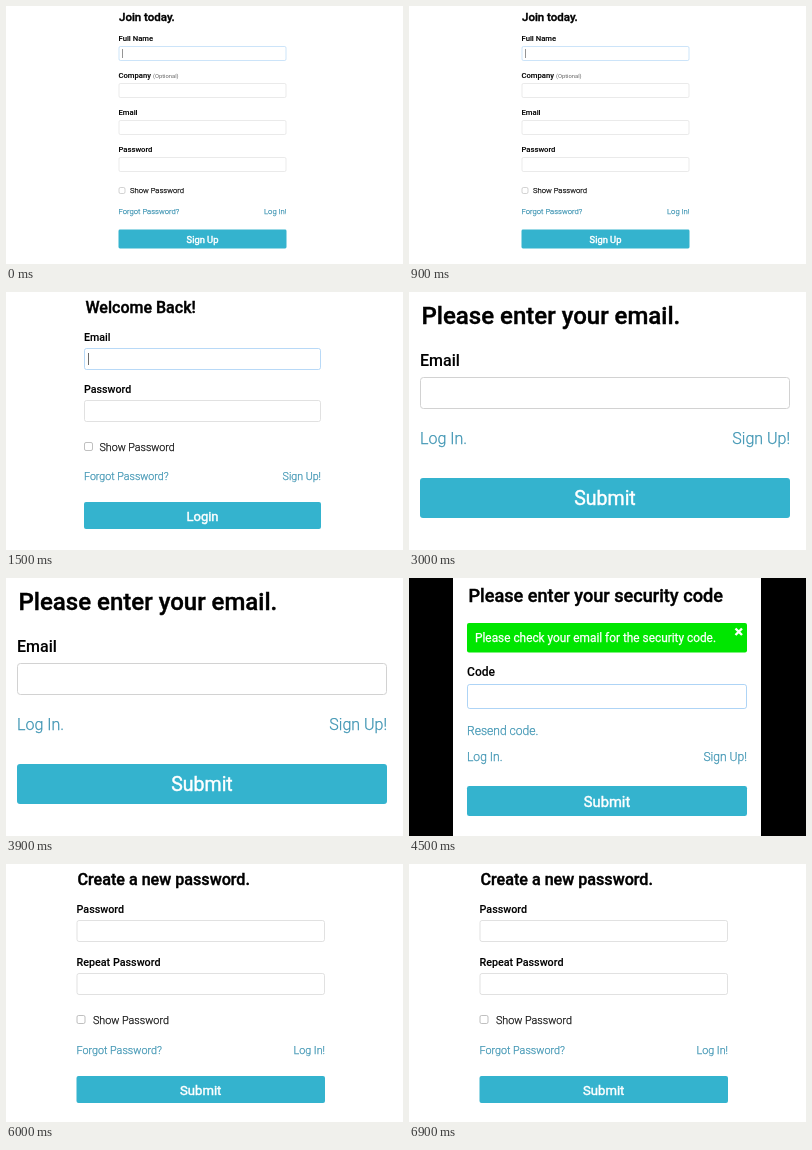
Write an HTML page that moves like this. It is 397 px wide and 258 px high and loops after 7500 ms.

```html
<!DOCTYPE html>
<html lang="en">
<head>
<meta charset="utf-8">
<title>Account forms</title>
<style>
  html, body { margin: 0; width: 100%; height: 100%; overflow: hidden; background: #fff; }
  svg { display: block; font-family: Roboto, Arial, sans-serif; }
  /* thin outlines give the type its heavier, smoothed look */
  text { stroke-width: .25px; }
  .title, .label { font-weight: 500; }
  .title { stroke: #000; stroke-width: .4px; }
  .label { stroke: #000; stroke-width: .1px; }
  .link { font-weight: 300; fill: #3f95b3; stroke: #3f95b3; }
  .plain { font-weight: 300; fill: #111; stroke: #111; }
  .note { fill: #666; }
  .light { fill: #fff; stroke: #fff; }
  .action { stroke-width: .45px; }
</style>
</head>
<body>
<svg id="stage" width="397" height="258" viewBox="0 0 397 258"></svg>
<script>
const HOLD = 1500;

const rect = (x, y, w, h, fill, r = 0) =>
  `<rect x="${x}" y="${y}" width="${w}" height="${h}" rx="${r}" fill="${fill}"/>`;

const outline = (x, y, w, h, stroke, r, line) =>
  `<rect x="${x + .5}" y="${y + .5}" width="${w - 1}" height="${h - 1}" rx="${r}"
    fill="#fff" stroke="${stroke}" stroke-width="${line}"/>`;

const text = (str, x, y, size, cls, anchor = 'start') =>
  `<text x="${x}" y="${y}" font-size="${size}" class="${cls}" text-anchor="${anchor}">${str}</text>`;

// Drawing helpers for a form spanning left..right, with type and lines scaled by k
function form(left, right, k) {
  const w = right - left;
  return {
    title: (str, x, y) => text(str, x, y, 24 * k, 'title'),
    label: (str, y) => text(str, left, y, 16 * k, 'label'),
    input: (y, h, focus) => outline(left, y, w, h, focus ? '#94c6f3' : '#d2d2d2', 3 * k, k),
    caret: (x, y, h) => rect(x, y, k, h, '#222'),
    check: (y, size, textX, base) =>
      outline(left, y, size, size, '#a0a0a0', 1.5, k) +
      text('Show Password', textX, base, 16 * k, 'plain'),
    links: (a, b, y) =>
      text(a, left, y, 16 * k, 'link') + text(b, right, y, 16 * k, 'link', 'end'),
    button: (str, y, h, base) =>
      rect(left, y, w, h, '#34b3ce', 3 * k) +
      text(str, (left + right) / 2, base, 19.5 * k, 'light action', 'middle')
  };
}

function signUp() {
  const f = form(112.5, 280.5, .479);
  const fields = ['Full Name', 'Company', 'Email', 'Password'];
  return f.title('Join today.', 113, 15) +
    fields.map((name, i) => f.label(name, 35 + 37 * i) + f.input(40 + 37 * i, 15, !i)).join('') +
    text('(Optional)', 147, 72, 5.8, 'note') +
    f.caret(116, 43, 9) +
    f.check(181, 7, 124, 187) +
    f.links('Forgot Password?', 'Log In!', 208) +
    f.button('Sign Up', 223.5, 19, 236.5);
}

function logIn() {
  const f = form(78, 315, .667);
  return f.title('Welcome Back!', 79.5, 21) +
    f.label('Email', 49) + f.input(56, 22, true) + f.caret(82, 61, 12) +
    f.label('Password', 101) + f.input(108, 22) +
    f.check(150, 9, 93.5, 159) +
    f.links('Forgot Password?', 'Sign Up!', 188) +
    f.button('Login', 210, 27, 228.5);
}

function askEmail() {
  const f = form(11, 381, 1);
  return f.title('Please enter your email.', 12.5, 32) +
    f.label('Email', 74) + f.input(85, 32) +
    f.links('Log In.', 'Sign Up!', 152) +
    f.button('Submit', 186, 40, 213);
}

function askCode() {
  const f = form(58, 338, .755);
  return rect(0, 0, 44, 258, '#000') + rect(352, 0, 45, 258, '#000') +
    f.title('Please enter your security code', 59.5, 24) +
    rect(58, 45, 280, 29.5, '#00e600', 2) +
    text('Please check your email for the security code.', 66, 64, 11.85, 'light') +
    '<path d="M326.5 50.5l6.5 6.5m0-6.5l-6.5 6.5" stroke="#fff" stroke-width="2.4"/>' +
    f.label('Code', 98) + f.input(106, 25, true) +
    f.links('Resend code.', '', 157) +
    f.links('Log In.', 'Sign Up!', 182.5) +
    f.button('Submit', 208, 30, 228.5);
}

function newPassword() {
  const f = form(70.5, 319, .672);
  return f.title('Create a new password.', 71.5, 21) +
    f.label('Password', 49) + f.input(56, 22) +
    f.label('Repeat Password', 101.5) + f.input(109, 22) +
    f.check(151, 9, 87, 160) +
    f.links('Forgot Password?', 'Log In!', 189.5) +
    f.button('Submit', 212, 27, 230.5);
}

const stage = document.getElementById('stage');
const screens = [signUp, logIn, askEmail, askCode, newPassword];
stage.innerHTML = screens.map(draw => `<g>${draw()}</g>`).join('');
const groups = [...stage.children];

function tick() {
  const current = Math.floor(performance.now() / HOLD) % groups.length;
  groups.forEach((g, i) => g.style.display = i === current ? '' : 'none');
  requestAnimationFrame(tick);
}
tick();
</script>
</body>
</html>
```
